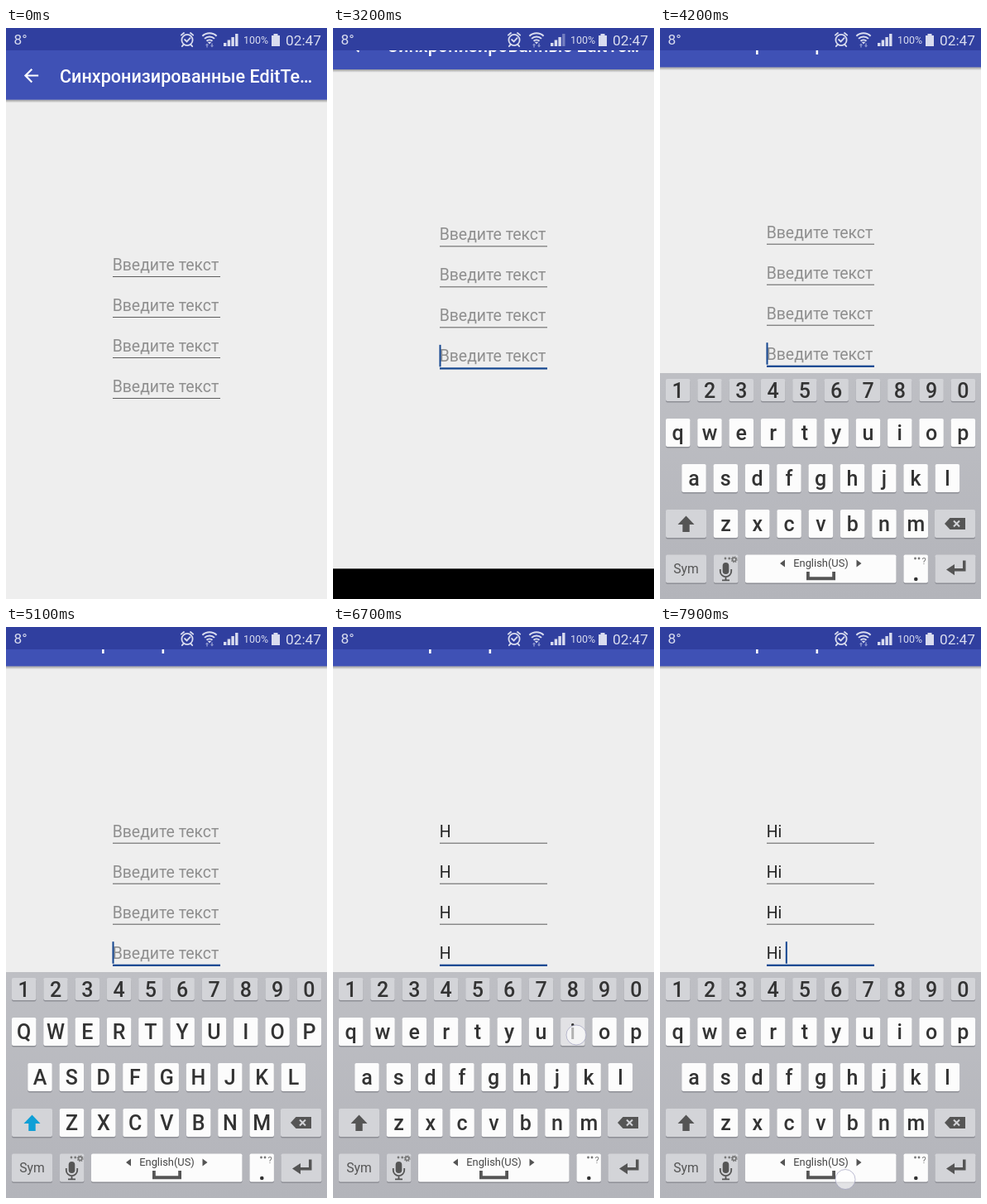
Animation of 388x690 px, one loop 8 s. Source, as an HTML page:

```html
<!DOCTYPE html>
<html lang="ru">
<head>
<meta charset="utf-8">
<title>Синхронизированные поля</title>
<style>
html, body { margin: 0; width: 100%; height: 100%; overflow: hidden; background: #000; }
svg { display: block; width: 388px; height: 690px; font-family: Roboto, "Noto Sans", sans-serif; }
.mid { text-anchor: middle; }
.letter { font-size: 25px; font-weight: 500; fill: #333; }
.field { font-size: 19.4px; }
</style>
</head>
<body>
<svg id="stage" viewBox="0 0 388 690">
  <defs>
    <linearGradient id="shade" x1="0" y1="0" x2="0" y2="1">
      <stop offset="0" stop-color="#000" stop-opacity=".36"/>
      <stop offset="1" stop-color="#000" stop-opacity="0"/>
    </linearGradient>
    <linearGradient id="board" x1="0" y1="0" x2="0" y2="1">
      <stop offset="0" stop-color="#bebfc4"/>
      <stop offset="1" stop-color="#b3b4ba"/>
    </linearGradient>
  </defs>
  <rect width="388" height="690"/>
  <g id="page">
    <rect width="388" height="690" fill="#eee"/>
    <rect y="86.5" width="388" height="4" fill="url(#shade)"/>
    <rect width="388" height="86.7" fill="#3f51b5"/>
    <path transform="translate(17.6 44.6) scale(1.078)" fill="#fff"
      d="M20 11H7.83l5.59-5.59L12 4l-8 8 8 8 1.41-1.41L7.83 13H20z"/>
    <text x="65" y="66" font-size="21.55" font-weight="500" fill="#fff">Синхронизированные EditTe…</text>
    <g id="fields"></g>
    <rect id="caret" y="419.5" width="2" height="26.5" fill="#12448f"/>
  </g>
  <g id="status" fill="#d9dcef">
    <rect width="388" height="27" fill="#303f9f"/>
    <text x="9.5" y="20" font-size="17.3">8°</text>
    <g fill="none" stroke="#d9dcef" stroke-width="1.8" stroke-linecap="round">
      <circle cx="219" cy="14.5" r="6.6"/>
      <path d="M216 14l2.6 2.4 4-4.2M211.8 8.6l3.2-2.6M226.2 8.6l-3.2-2.6M214.4 20.4l-1.6 1.8M223.6 20.4l1.6 1.8"/>
      <path stroke-width="2" stroke-linecap="butt" d="M237.4 9.7a12.4 12.4 0 0 1 17.2 0M240 12.9a8.7 8.7 0 0 1 12 0M242.5 15.8a5.2 5.2 0 0 1 7 0"/>
    </g>
    <path d="M243.6 16.8h4.8L246 19.6z"/>
    <path fill="#8d97cf" d="M241 21l2-2.5 2 2.5h-1.3v2.5h-1.4V21zM247 21l2 2.5 2-2.5h-1.3v-2.5h-1.4V21z"/>
    <g id="bars"></g>
    <text x="287" y="19" font-size="12.4">100%</text>
    <path d="M323.5 7h5v2h2.5v13h-10V9h2.5z"/>
    <text x="338" y="20.5" font-size="17.3">02:47</text>
  </g>
  <g id="keyboard">
    <rect y="417" width="388" height="273" fill="url(#board)"/>
    <g id="keys"></g>
    <path id="shift" d="M31.5 589.5L41.5 600H35.7v9h-8.4v-9h-5.8z"/>
    <path fill="#555" d="M344 599l6.5-7H369v14h-18.5z"/>
    <path stroke="#d3d4d8" stroke-width="2" d="M355 595.5l7 7M362 595.5l-7 7"/>
    <text class="mid" x="31.5" y="659" font-size="15.7" fill="#555">Sym</text>
    <g fill="#555">
      <rect x="75.7" y="646" width="7.6" height="14" rx="3.8"/>
      <path fill="none" stroke="#555" stroke-width="1.8" d="M72.8 654v2.5a6.7 6.7 0 0 0 13.4 0V654M79.5 663v4.5M75 667.3h9"/>
      <g fill="#777">
        <circle cx="79" cy="641" r="1.4"/><circle cx="83.7" cy="641" r="1.4"/>
        <circle cx="308.5" cy="641" r="1.4"/><circle cx="313" cy="641" r="1.4"/>
        <text class="mid" x="319" y="648" font-size="11">?</text>
      </g>
      <circle cx="89.7" cy="642.3" r="2.2" fill="none" stroke="#777" stroke-width="1.7"/>
      <circle cx="89.7" cy="642.3" r="3.4" fill="none" stroke="#777" stroke-width="1.2" stroke-dasharray="1.33"/>
      <circle cx="309.3" cy="666" r="2.3" fill="#333"/>
      <path d="M366 643.5h3.5v13H356v4.8l-10-6.7 10-6.6v5h10z"/>
      <path d="M151 642.5v9l-6-4.5zM237.5 642.5v9l6-4.5z"/>
      <text class="mid" x="194.5" y="651.3" font-size="12.9" fill="#444">English(US)</text>
      <path d="M177 657h3.8v6.2h27.4V657h3.8v10.2h-35z"/>
    </g>
  </g>
  <circle id="touch" r="12" fill="#fff" fill-opacity=".62" stroke="#9a9abb" stroke-opacity=".65"/>
</svg>
<script>
const LOOP = 8000, STEP = 100, PAN = 39.3;
const $ = id => document.getElementById(id);

function add(parent, tag, attrs, text = "") {
  const el = document.createElementNS("http://www.w3.org/2000/svg", tag);
  for (const name in attrs) el.setAttribute(name, attrs[name]);
  el.textContent = text;
  parent.append(el);
  return el;
}

// Four linked inputs; the last one takes the focus.
const inputs = [], lines = [];
for (let i = 0; i < 4; i++) {
  const y = 293 + 49 * i;
  inputs.push(add($("fields"), "text", { class: "field", x: 128.7, y }));
  lines.push(add($("fields"), "rect", { x: 129, y: y + 7, width: 130 }));
}

const bars = [4, 7.5, 11, 15].map((h, i) =>
  add($("bars"), "rect", { x: 263 + 4.7 * i, y: 22 - h, width: 3.4, height: h }));

const keys = {}, letters = [];
function addKey(name, x, y, width, height, fill) {
  add($("keys"), "rect", { x, y: y + 1.5, width, height, rx: 2, fill: "#8e8f96" });
  keys[name] = { fill, el: add($("keys"), "rect", { x, y, width, height, rx: 2, fill }) };
}

const GREY = "#d3d4d8", WHITE = "#fcfcfc";
const rows = [
  ["1234567890", 21.7, 424, 27, GREY, 447],
  ["qwertyuiop", 21.7, 472, 34, WHITE, 498],
  ["asdfghjkl", 41, 527, 34, WHITE, 552.8],
  ["zxcvbnm", 79.5, 582, 34, WHITE, 607.5]
];
for (const [chars, x, y, height, fill, base] of rows) {
  [...chars].forEach((char, i) => {
    const cx = x + 38.3 * i;
    addKey(char, cx - 14.7, y, 29.4, height, fill);
    const el = add($("keys"), "text", { class: "letter mid", x: cx, y: base }, char);
    letters.push({ el, char });
  });
}
addKey("shift", 7, 582, 49, 34, GREY);
addKey("back", 332, 582, 49, 34, GREY);
addKey("sym", 7, 636.5, 49, 34, GREY);
addKey("mic", 65, 636.5, 29.4, 34, GREY);
addKey("space", 103, 636.5, 182.5, 34, WHITE);
addKey("dot", 294.5, 636.5, 29.4, 34, WHITE);
addKey("enter", 332.5, 636.5, 49, 34, GREY);

// start, end, x, y, key
const taps = [
  [2600, 2900, 194, 432, ""],
  [4600, 4900, 31, 600, "shift"],
  [5600, 6000, 231.5, 547, "h"],
  [6400, 6800, 294, 493, "i"],
  [7600, 8000, 224, 667.5, "space"]
];

// time, text, caret x
const typed = [[0, "", 128.5], [6000, "H", 142.8], [6800, "Hi", 147.2], [7900, "Hi ", 151.8]];
const FOCUS = 2900;

const clamp = v => Math.max(0, Math.min(1, v));
const easeOut = (t, start, length) => 1 - (1 - clamp((t - start) / length)) ** 2;

function draw(t) {
  const focused = t >= FOCUS;
  const [since, text, caretX] = typed.filter(row => row[0] <= t).pop();

  $("page").setAttribute("transform", `translate(0 ${-PAN * easeOut(t, 3000, 270)})`);
  $("keyboard").setAttribute("transform", `translate(0 ${273 * (1 - easeOut(t, 3350, 450))})`);

  inputs.forEach((el, i) => {
    el.textContent = text || "Введите текст";
    el.setAttribute("fill", text ? "#212121" : "#8f8f8f");
    const active = focused && i === 3;
    lines[i].setAttribute("height", active ? 2.2 : 1);
    lines[i].setAttribute("fill", active ? "#12448f" : "#5c5c5c");
  });

  const blinkStart = since || FOCUS;
  const lit = focused && (t - blinkStart) % 1000 < 500;
  $("caret").setAttribute("x", caretX);
  $("caret").setAttribute("visibility", lit ? "visible" : "hidden");

  const caps = t >= 4900 && t < 6000;
  for (const { el, char } of letters) el.textContent = caps ? char.toUpperCase() : char;
  $("shift").setAttribute("fill", caps ? "#0f9fd6" : "#555");
  bars[3].setAttribute("opacity", t >= 700 && t < 3500 ? 0.4 : 1);

  const tap = taps.find(([start, end]) => t >= start && t < end);
  for (const name in keys) {
    const { el, fill } = keys[name];
    const down = tap && tap[4] === name && name !== "space";
    el.setAttribute("fill", down ? "#e2e2e5" : fill);
  }
  $("touch").setAttribute("visibility", tap ? "visible" : "hidden");
  if (tap) {
    $("touch").setAttribute("cx", tap[2]);
    $("touch").setAttribute("cy", tap[3]);
  }
}

let last = -1;
function tick() {
  const t = Math.floor((performance.now() % LOOP) / STEP) * STEP;
  if (t !== last) draw(last = t);
  requestAnimationFrame(tick);
}
tick();
</script>
</body>
</html>
```
